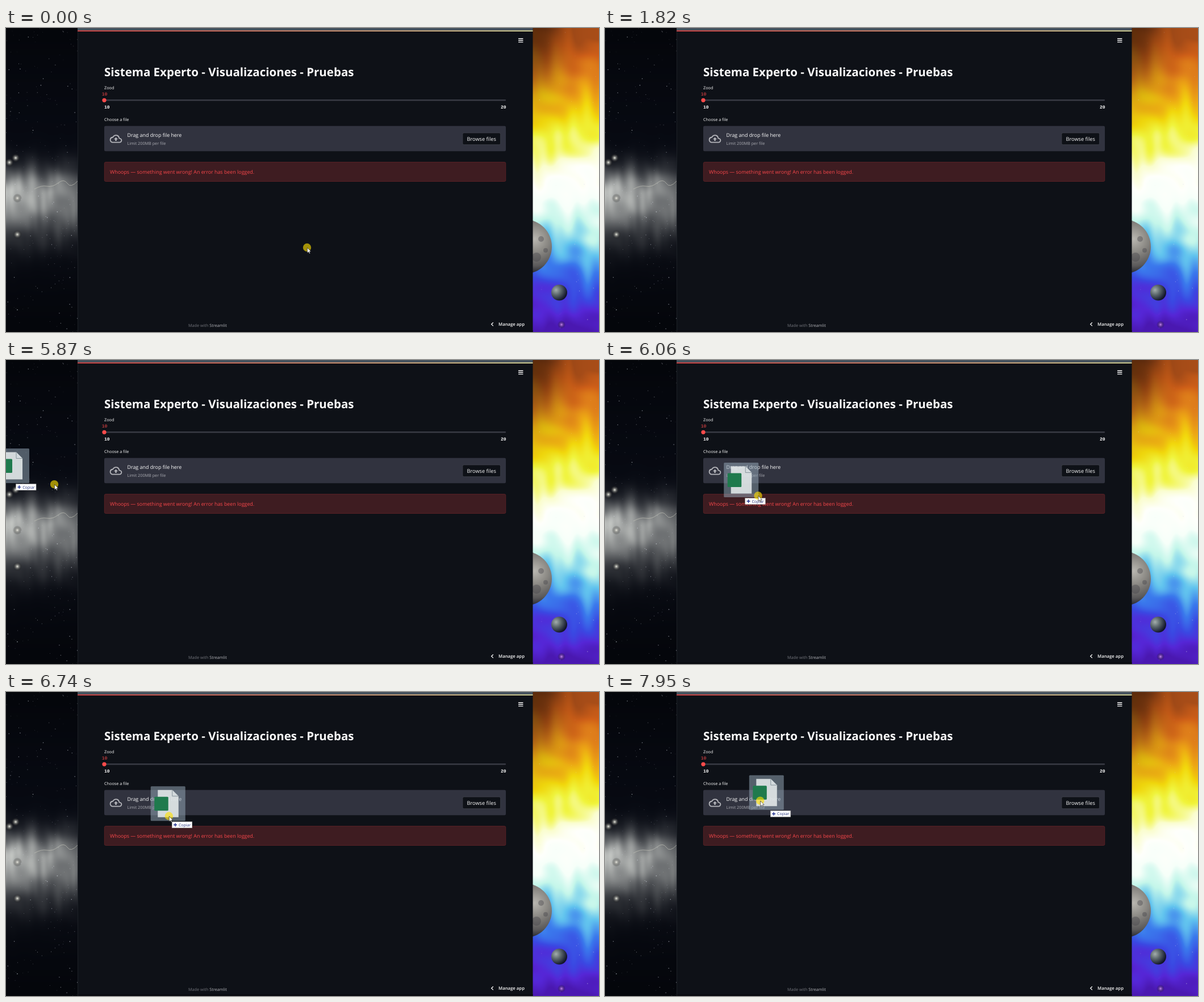
Recreate the animation shown at these times as an HTML page with a canvas. Size 1044 px wide and 536 px high, loop 8000 ms.

```html
<!DOCTYPE html>
<html lang="es">
<head>
<meta charset="utf-8">
<title>Sistema Experto</title>
<style>
  html, body { margin: 0; width: 100%; height: 100%; overflow: hidden; background: #03040b; }
  canvas, svg { position: absolute; inset: 0; width: 100%; height: 100%; }
  text { font-family: "Open Sans", "Noto Sans", sans-serif; fill: #fafafa; text-rendering: geometricPrecision; }
  .title { font-size: 20.5px; font-weight: 700; }
  .body { font-size: 8.9px; font-weight: 500; }
  .small { font-size: 7.25px; font-weight: 500; }
  .mono { font: 700 8px "Liberation Mono", monospace; }
</style>
</head>
<body>
<canvas id="sky" width="1044" height="536"></canvas>
<svg viewBox="0 0 1044 536" preserveAspectRatio="none">
  <defs>
    <radialGradient id="rock" cx=".68" cy=".36" r=".62">
      <stop offset="0" stop-color="#b9b7b1"/>
      <stop offset=".4" stop-color="#8c8a85"/>
      <stop offset=".8" stop-color="#5a595a"/>
      <stop offset="1" stop-color="#2a2b33"/>
    </radialGradient>
    <radialGradient id="moonlet" cx=".3" cy=".34" r=".7">
      <stop offset="0" stop-color="#a3adac"/>
      <stop offset=".45" stop-color="#5a666b"/>
      <stop offset="1" stop-color="#11152a"/>
    </radialGradient>
    <linearGradient id="accent">
      <stop offset="0" stop-color="#ff4b4b"/>
      <stop offset="1" stop-color="#fffdb0"/>
    </linearGradient>
  </defs>

  <circle cx="913" cy="385.500" r="48" fill="url(#rock)"/>
  <g fill="#45444a" opacity=".4">
    <circle cx="942" cy="372" r="5"/><circle cx="950" cy="392" r="4"/><circle cx="934" cy="404" r="8"/>
  </g>
  <circle cx="974" cy="466.500" r="14" fill="url(#moonlet)"/>
  <path d="M50 284Q62 277 72 279T92 273 108 274 126 270" fill="none" stroke="#c9c9bd" opacity=".6"/>

  <path fill="#0e1117" d="M126 0H927.500V536H126Z"/>
  <path fill="#0a0b10" d="M126 533H927.500V536H126Z"/>
  <path fill="#47535e" d="M126 0H927.500V4.500H126Z"/>
  <path fill="url(#accent)" d="M126 4.500H927.500V6H126Z"/>
  <path id="edge" d="M126.500 6V536" stroke="#59606a"/>

  <path d="M902 18.700H910.400M902 21.800H910.400M902 24.900H910.400" stroke="#fafafa" stroke-width="1.400"/>
  <text class="title" x="173" y="85">Sistema Experto - Visualizaciones - Pruebas</text>

  <text class="small" x="173" y="107.700">Zood</text>
  <text class="mono" x="173.500" y="119.300" text-anchor="middle" style="fill:#ff4b4b;font-weight:400">10</text>
  <rect x="173" y="126" width="707" height="2.500" rx="1" fill="#383a44"/>
  <circle cx="173" cy="127.300" r="3.600" fill="#ff4b4b"/>
  <text class="mono" x="173" y="142.200">10</text>
  <text class="mono" x="880.500" y="142.200" text-anchor="end">20</text>

  <text class="small" x="173" y="164.400">Choose a file</text>
  <rect x="173" y="172.800" width="707" height="44.500" rx="2.300" fill="#31333f"/>
  <path transform="translate(182.700 184.600) scale(.9)" fill="#b4b5ba" d="M19.350 10.040A7.490 7.490 0 0 0 12 4C9.110 4 6.600 5.640 5.350 8.040A6 6 0 0 0 0 14c0 3.310 2.690 6 6 6h13c2.760 0 5-2.240 5-5 0-2.640-2.050-4.780-4.650-4.960zM19 18H6c-2.210 0-4-1.790-4-4 0-2.050 1.530-3.760 3.560-3.970l1.070-.11.5-.95A5.470 5.470 0 0 1 12 6c2.620 0 4.880 1.860 5.390 4.430l.3 1.500 1.530.11A2.980 2.980 0 0 1 22 15c0 1.650-1.350 3-3 3zM8 13h2.550v3h2.900v-3H16l-4-4z"/>
  <text class="body" x="213.500" y="192.400">Drag and drop file here</text>
  <text class="small" x="213.500" y="206" style="fill:#a9aab0">Limit 200MB per file</text>
  <rect x="803.900" y="184.900" width="66.700" height="20.800" rx="2.300" fill="#0e1117" stroke="#40434c" stroke-width=".8"/>
  <text class="body" x="837.200" y="198.500" text-anchor="middle" style="font-size:9.200px">Browse files</text>

  <rect x="173.300" y="236.500" width="706.500" height="34" rx="2.300" fill="#3e1c21" stroke="#642429" stroke-width=".8"/>
  <text class="body" x="183" y="256.900" style="fill:#f8474a">Whoops — something went wrong! An error has been logged.</text>

  <text class="small" x="321" y="527" style="fill:#73757c">Made with <tspan fill="#b4b5ba">Streamlit</tspan></text>
  <path d="M857.800 519.200L854.600 522.300 857.800 525.400" fill="none" stroke="#fafafa" stroke-width="1.300"/>
  <text x="867" y="524.900" style="font-size:7.750px;font-weight:600">Manage app</text>

  <g id="file">
    <rect width="61" height="61" rx="1.500" fill="#96aab9" opacity=".52"/>
    <path d="M12.500 6.500H38L49 17.500V54.500H12.500Z" fill="#e2e7e8" opacity=".9"/>
    <path d="M38 6.500V17.500H49" fill="#d3dadd" stroke="#75838c" stroke-width=".8"/>
    <rect x="6.500" y="18.500" width="24.500" height="24.500" rx="1.500" fill="#1f7a4d"/>
    <rect x="37.500" y="62.700" width="35.500" height="10.800" fill="#fff" stroke="#a8a8a8" stroke-width=".6"/>
    <path d="M40.300 68.100H46.300M43.300 65.100V71.100" stroke="#1f2f8f" stroke-width="1.400"/>
    <text x="49.200" y="70.700" style="fill:#26357f;font-size:7px">Copiar</text>
  </g>
  <g id="pointer">
    <circle id="press" r="7.200" fill="#ffe100" opacity=".62"/>
    <path d="M.4 .3V9.800L2.600 7.700 4 10.900 5.500 10.200 4.100 7.200H7Z" fill="#fff" stroke="#111" stroke-width=".6"/>
  </g>
</svg>
<script>
  const $ = id => document.getElementById(id);
  const LOOP = 8000, TICK = 200 / 3, W = 1044, H = 536;
  const LEFT = 126, RIGHT = 927;
  const sky = $("sky").getContext("2d");

  let seed = 7;
  const rand = () => (seed = seed * 16807 % 2147483647) / 2147483647;

  // Drifting streaks between -1 and 1
  const cloud = (x, y) => (Math.sin(x * .07 + y * .05 + 2 * Math.sin(y * .021 - x * .03))
    + Math.sin(x * .13 - y * .09 + 2 * Math.sin(x * .05 + y * .04)) * .6) / 1.6;

  // Grey band of light, steep above and long below
  function galaxy(x, y) {
    const d = y - 292 + 7 * cloud(x, y);
    const light = Math.exp(-((d / (d < 0 ? 42 : 66)) ** 2)) * (175 - x * .5 + 16 * cloud(x * 2, y));
    const haze = 8 + 6 * Math.sin(y / H * Math.PI);
    return [haze * .5 + light, haze * .7 + light, haze * 1.3 + light * .94];
  }

  function ramp(colors) {
    const rgb = colors.map(c => [1, 3, 5].map(i => parseInt(c.slice(i, i + 2), 16)));
    return t => {
      const p = Math.min(Math.max(t, 0), .999) * (rgb.length - 1), i = Math.floor(p);
      return rgb[i].map((v, c) => v + (rgb[i + 1][c] - v) * (p - i));
    };
  }
  const spectrum = ramp(["#a84d18", "#cf5f18", "#e0801a", "#eda614", "#f2d80c", "#f0f43c", "#fafdcf", "#fefffb",
    "#f6fff9", "#c4f6ea", "#62c4ee", "#3a78ec", "#3a48e2", "#5526d6", "#4a18b0"]);

  function nebula(x, y) {
    const dx = x - 985;
    const tilt = -.05 - .3 * Math.cos(y / 67);
    const bend = y + dx * tilt + 20 * cloud(x, y);
    const shade = 1 - .55 * Math.exp(-(((x - RIGHT) / 48) ** 2) - (y / 90) ** 2);
    return spectrum(bend / H).map(v => v * shade);
  }

  function paint(x0, x1, color) {
    const img = sky.createImageData(x1 - x0, H);
    let i = 0;
    for (let y = 0; y < H; y++) {
      for (let x = x0; x < x1; x++) img.data.set([...color(x, y), 255], 4 * i++);
    }
    sky.putImageData(img, x0, 0);
  }

  function glow(x, y, r, color) {
    const g = sky.createRadialGradient(x, y, 0, x, y, r);
    g.addColorStop(0, color);
    g.addColorStop(1, "transparent");
    sky.fillStyle = g;
    sky.fillRect(x - r, y - r, 2 * r, 2 * r);
  }

  function stars(count, x0, x1) {
    for (let i = 0; i < count; i++) {
      sky.fillStyle = `rgba(225,230,240,${.15 + rand() * .55})`;
      const size = .6 + rand() ** 4;
      sky.fillRect(x0 + rand() * (x1 - x0), rand() * H, size, size);
    }
  }

  paint(0, LEFT, galaxy);
  paint(RIGHT, W, nebula);
  stars(230, 0, LEFT);
  stars(40, RIGHT, W);
  for (const [x, y] of [[17, 229], [6, 237], [20, 300], [20, 364]]) glow(x, y, 8, "#f0f0e6");
  glow(978, 523, 7, "#d08cf8");

  // Moves: start tick, end tick, end place; every move eases out
  const hover = { x: 530, y: 387, moves: [[0, 5, 330, 154], [10, 12, 330, 153], [19, 26, 149, 140]] };
  const drag = { x: -20, y: 156, moves: [[88, 92, 242, 184.5], [95.8, 108, 264.5, 152], [108, 113, 257, 149.5], [118.8, 121, 233, 128]] };

  function at({ x, y, moves }, n) {
    for (const [start, end, toX, toY] of moves) {
      if (n <= start) break;
      const k = 1 - (1 - Math.min((n - start) / (end - start), 1)) ** 1.5;
      x += (toX - x) * k;
      y += (toY - y) * k;
    }
    return [x, y];
  }

  const show = (id, on) => $(id).setAttribute("visibility", on ? "visible" : "hidden");
  const place = (id, x, y) => $(id).setAttribute("transform", `translate(${x} ${y})`);

  function draw() {
    const n = Math.floor(performance.now() % LOOP / TICK + .3);
    const dragging = n >= 88;
    place("file", ...at(drag, n));
    if (dragging) {
      // The pointer runs slightly ahead of the dragged file
      const [x, y] = at(drag, n + .8);
      place("pointer", x + 30.5, y + 55);
    } else {
      place("pointer", ...at(hover, n));
    }
    show("pointer", n < 27 || dragging);
    show("press", n < 1 || dragging);
    show("file", dragging);
    $("edge").setAttribute("opacity", n >= 77 && n < 84 ? .6 : .2);
    requestAnimationFrame(draw);
  }
  draw();
</script>
</body>
</html>
```
